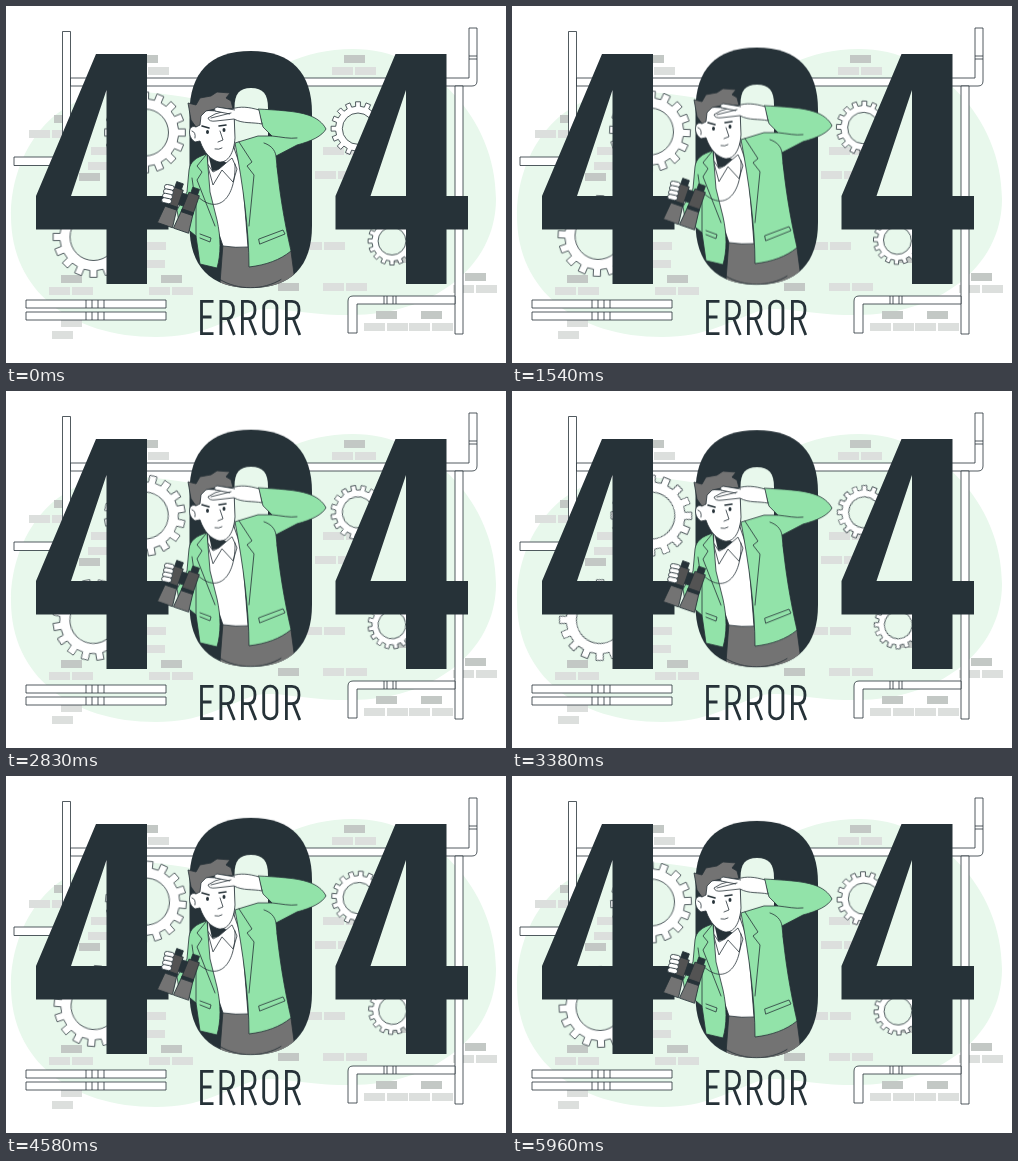
An HTML page for the animation above (6000 ms loop, 500 by 357 pixels).

```html
<!DOCTYPE html>
<html lang="en">
<head>
<meta charset="utf-8">
<title>404 error</title>
<style>
  html, body { margin: 0; width: 100%; height: 100%; overflow: hidden; background: #fff; }
  svg { display: block; width: 100vw; height: 100vh; }
  .line { fill: none; stroke: #263238; stroke-width: .8; stroke-linejoin: round; stroke-linecap: round; }
  .brow { stroke-width: 1.6; }
  .white, .mint, .grey, .steel, .dark { stroke: #263238; stroke-width: .8; stroke-linejoin: round; }
  .white { fill: #fff; }
  .mint { fill: #92e3a9; }
  .grey { fill: #737373; }
  .steel { fill: #535353; }
  .dark, .ink { fill: #263238; }
  .letters { fill: none; stroke: #263238; stroke-width: 2.8; }
</style>
</head>
<body>
<svg viewBox="0 0 500 357" role="img" aria-label="404 ERROR">
  <defs>
    <path id="four" fill-rule="evenodd" d="M90 48H141V190H162.500V223.500H141V278H100.500V223.500H30V190ZM100.500 84L65 190H100.500Z"/>
    <path id="R" d="M1.400 329V295.400H7C12 295.400 14 298.500 14 304C14 310 11.800 312.600 7 312.600H1.400M8.200 312.600L14.800 329"/>
    <path id="zero" d="M183.500 107C183.500 67 204 45 244.800 45S306 67 306 107V220C306 260 285.500 282 244.800 282S183.500 260 183.500 220Z"/>
    <clipPath id="zeroClip"><use href="#zero"/></clipPath>
  </defs>

  <path fill="#e8f8ec" d="M5 210C5 150 42 92 105 87C160 82 190 98 224 94C262 64 296 43 347 43C424 43 490 112 490 193C490 262 425 309 345 309C300 310 275 300 250 304C215 316 195 331 150 331C65 331 5 285 5 210Z"/>
  <g id="bricks"></g>

  <g class="white">
    <path d="M56.500 25.500H64.500V210H56.500ZM8 151H56.500V159.500H8Z"/>
    <path d="M64.500 72H463V22H471V75Q471 80 466 80H64.500Z"/>
    <path d="M463 50H471M463 53H471M449 80H457V328H449Z"/>
    <path d="M449 290H347Q342 290 342 295V327H351V298H449Z"/>
    <path d="M378 290v8m3 -8v8m6 -8v8m3 -8v8"/>
    <g id="lowPipe"><path d="M20 294H160V302H20Z"/><path d="M80 294v8m6 -8v8m6 -8v8m6 -8v8"/></g>
    <use href="#lowPipe" y="12"/>
  </g>

  <g id="gears"></g>

  <use href="#four" class="ink"/>
  <use href="#four" class="ink" x="299.500"/>

  <g class="letters">
    <path d="M207.500 295.400H195.500V327.600H207.500M195.500 311H205.500"/>
    <use href="#R" x="213.500"/>
    <use href="#R" x="235"/>
    <rect x="257.700" y="295.200" width="13.200" height="32.600" rx="6.400"/>
    <use href="#R" x="279"/>
  </g>

  <g id="float">
    <use href="#zero" class="ink"/>
    <path fill="#e8f8ec" d="M228.500 102C228.500 88 233 82 245 82S262 88 262 102V160H228.500Z"/>
    <path fill="#c3c8c5" d="M243 109H262V117H243Z"/>
    <path class="grey" clip-path="url(#zeroClip)" d="M217 238H284L288 268V290H213L215 264Z"/>
    <path class="line" d="M214 273.500C232 284.500 257 284.500 275 273.500"/>

    <!-- shirt and neck -->
    <path class="white" d="M202 148L228 142L236 165L242 241Q230 242 217 240L200 190Z"/>
    <path class="ink" d="M202 147L221 157L214 164L206 165Z"/>
    <path class="white" d="M201 157L207 166L213 163L226 152L231 163L227 176L216 164L207 179Z"/>

    <!-- jacket -->
    <path class="mint" d="M201 148C190 151 184 156 183 164L181 186L171 204L173 216L190 230L194 258L211 262C215 248 215 232 211 214L204 186Z"/>
    <path class="line" d="M200 149L191 160L196 166L191 174L209 220M186 172L190 200L190 230M194 228L205 232L204 236L194 232"/>
    <path class="mint" d="M229 137L252 130L266 130L257 121L252 103C270 104 291 105 302 109C311 112 317 117 320 123C316 130 306 135 291 139L270 150C273 184 278 214 285 245C274 254 260 259 243 261C243 224 237 179 229 137Z"/>
    <path class="line" d="M233 136L246 156L241 160L248 169L243 220M266 130C276 131 283 133 291 132M270 150C269 143 264 139 258 137M253 233L277 224L279 228L254 238ZM273 171L271 160"/>

    <!-- head -->
    <path class="white" d="M193 104L190 121C182 118 181 131 189 136L194 135C198 147 205 154 213 156C222 157 228 147 229 132L228 106Z"/>
    <path class="grey" d="M190 121L185 114L182 97L190 99L194 92L205 90L211 86L224 87L220 92L225 95L227 103L214 102L200 105L195 110L194 119Z"/>
    <path class="line" d="M186 125Q190 126 189 132M214 125L217 134L212 136M209 143Q213 144 216 142"/>
    <path class="line brow" d="M196 120L203 122M213 120L220 119"/>
    <ellipse class="ink" cx="201.500" cy="126" rx="1.500" ry="2"/>
    <ellipse class="ink" cx="218" cy="124" rx="1.500" ry="2"/>

    <!-- saluting hand -->
    <path class="white" d="M253 104C243 101 234 100 226 103L209 108L202 112Q203 116 210 115L228 113C237 118 247 116 256 118Z"/>
    <path class="white" d="M229 104L211 101Q207 102 209 105L224 108"/>
    <path class="line" d="M205 112L225 107"/>

    <!-- strap and binoculars -->
    <path class="line" d="M190 189C212 211 230 192 229 158"/>
    <g transform="translate(177 182) rotate(19)">
      <path class="dark" d="M-3 5H9V17H-3Z"/>
      <g id="barrel">
        <path class="dark" d="M-8 -4H-1V3H-8Z"/>
        <path class="steel" d="M-10 2H1V22H-11Z"/>
        <path class="grey" d="M-11 22H1L3 41H-13Z"/>
        <path class="dark" d="M-11 20H1V23H-11Z"/>
      </g>
      <use href="#barrel" x="17"/>
    </g>
    <g class="white" transform="translate(159 178) rotate(12)">
      <rect id="finger" width="10" height="5" rx="2.500"/>
      <use href="#finger" y="4.500"/>
      <use href="#finger" y="9"/>
      <use href="#finger" y="13.500"/>
    </g>
  </g>
</svg>

<script>
  const LOOP = { duration: 6000, iterations: Infinity, easing: 'linear' };
  const NS = 'http://www.w3.org/2000/svg';
  const DARK = '#c3c8c5';
  const LIGHT = '#dcdfdd';

  function add(parent, tag, attrs) {
    const el = document.createElementNS(NS, tag);
    for (const key in attrs) el.setAttribute(key, attrs[key]);
    return parent.appendChild(el);
  }

  const bricks = document.getElementById('bricks');

  function brick(x, y, fill) {
    add(bricks, 'rect', { x, y, width: 21, height: 8, fill });
  }

  function brickPair(x, y) {
    brick(x, y, LIGHT);
    brick(x + 23, y, LIGHT);
  }

  // A dark brick resting on two light ones.
  function brickStack(x, y) {
    brick(x, y, DARK);
    brickPair(x - 12, y + 12);
  }

  [[131, 49], [338, 49], [55, 269], [155, 269], [370, 305], [415, 305], [459, 267]]
    .forEach(p => brickStack(...p));
  [[23, 124], [85, 141], [317, 141], [309, 165], [116, 236], [295, 236], [317, 277]]
    .forEach(p => brickPair(...p));
  [[48, 109], [73, 167], [272, 277], [387, 249]].forEach(p => brick(...p, DARK));
  [[82, 156], [138, 254], [55, 313], [46, 325]].forEach(p => brick(...p, LIGHT));

  function gearPath(r, hole) {
    const teeth = 16;
    const corners = [[-.27, .83], [-.23, 1], [.23, 1], [.27, .83]];
    const points = [];
    for (let i = 0; i < teeth; i++) {
      for (const [shift, size] of corners) {
        const a = (i + shift) / teeth * 2 * Math.PI;
        points.push(`${(r * size * Math.sin(a)).toFixed(2)} ${(-r * size * Math.cos(a)).toFixed(2)}`);
      }
    }
    const arc = `a${hole} ${hole} 0 1 0 `;
    return `M${points.join('L')}ZM${-hole} 0${arc}${2 * hole} 0${arc}${-2 * hole} 0Z`;
  }

  // Each gear turns about a point slightly above its centre.
  function addGear(x, y, r) {
    const place = add(document.getElementById('gears'), 'g', { transform: `translate(${x} ${y})` });
    const spin = add(place, 'g', {});
    add(spin, 'path', {
      d: gearPath(r, r * .58), class: 'white', 'fill-rule': 'evenodd',
      transform: `translate(0 ${r / 40})`
    });
    spin.animate({ transform: ['rotate(0deg)', 'rotate(360deg)'] }, LOOP);
  }
  addGear(139, 125.5, 40.5);
  addGear(87.5, 230, 40.5);
  addGear(352, 122, 27);
  addGear(386, 234.5, 24);

  document.getElementById('float').animate({
    transform: ['translateY(0)', 'translateY(-6.67px)', 'translateY(0)']
  }, LOOP);
</script>
</body>
</html>
```
